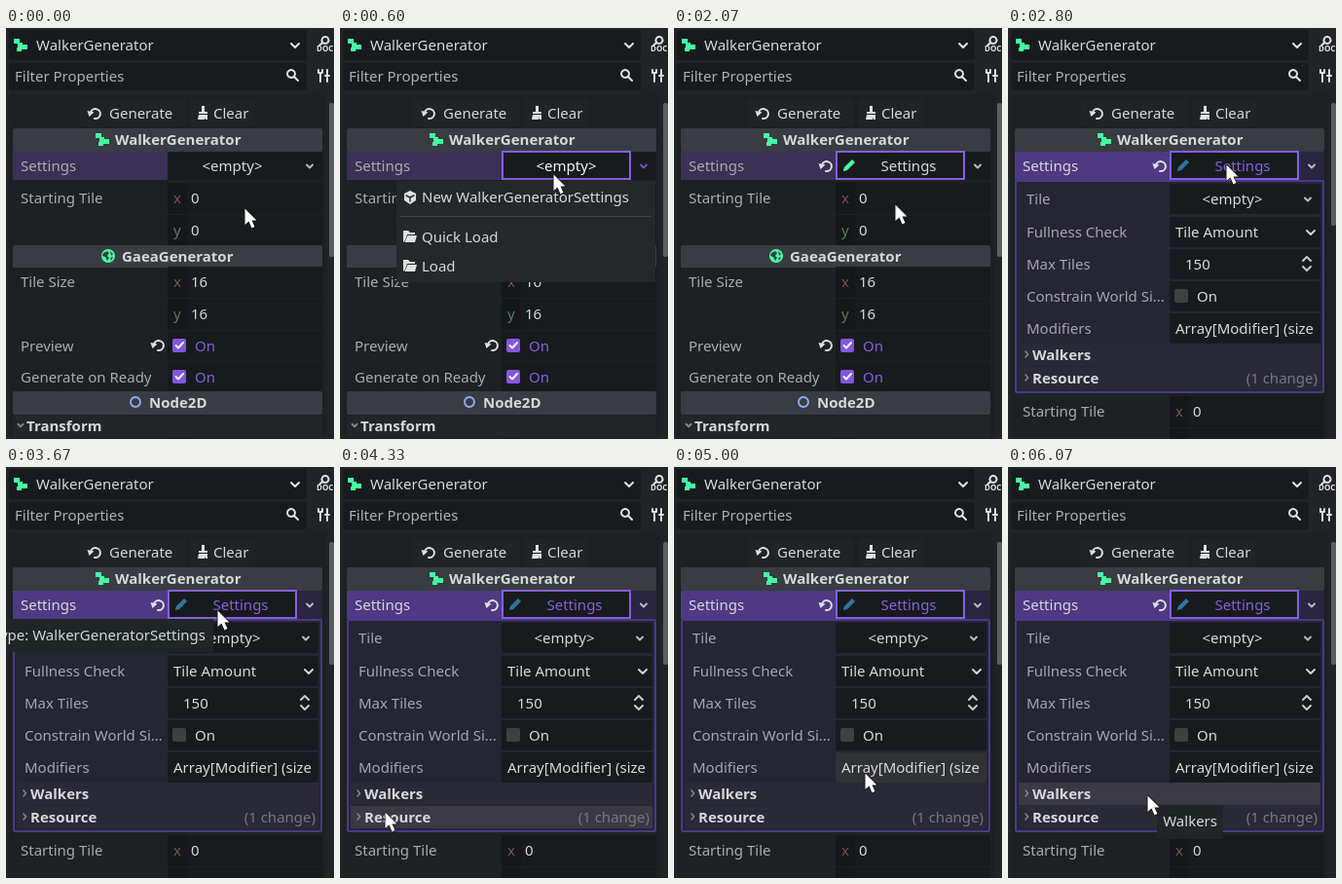
An HTML page with a canvas that plays this animation: 337x422 px, repeating every 6390 ms.

```html
<!DOCTYPE html>
<html lang="en">
<head>
<meta charset="utf-8">
<title>Inspector</title>
<style>
  html, body { margin: 0; width: 100%; height: 100%; overflow: hidden; background: #202427; }
  canvas { display: block; }
</style>
</head>
<body>
<canvas id="stage" width="337" height="422"></canvas>
<script>
const ctx = document.getElementById('stage').getContext('2d');
const LOOP = 6390, TICK = 1000 / 15;
const C = {
  base: '#202427', panel: '#1d2124', field: '#181b1e', axis: '#15171a', header: '#393c41',
  text: '#d6d7d8', label: '#a9abad', dim: '#77777f', white: '#f2f2f3',
  purple: '#855fe0', green: '#45ffa2', inner: '#262534', border: '#4a3986'
};

// Pointer tip: [tick, x, y], linear between entries.
const pointerPath = [
  [0, 245, 185], [4, 219, 150], [11, 219, 150], [19, 228, 186], [22, 228, 186],
  [23, 228, 185], [27, 228, 185], [29, 227, 181], [34, 227, 181], [38, 224, 140],
  [44, 224, 140], [47, 222, 145], [54, 222, 145], [55, 217, 147], [64, 62, 328],
  [65, 46, 354], [68, 62, 402], [70, 62, 402], [75, 196, 314], [76, 212, 292],
  [77, 205, 289], [80, 127, 339], [82, 143, 337], [96, 143, 337]
];

function pointerAt(tick) {
  const i = pointerPath.findIndex(p => p[0] > tick);
  const [t0, x0, y0] = pointerPath[i - 1], [t1, x1, y1] = pointerPath[i];
  const k = (tick - t0) / (t1 - t0);
  return { x: Math.round(x0 + (x1 - x0) * k), y: Math.round(y0 + (y1 - y0) * k) };
}

function rect(x, y, w, h, color, radius = 0) {
  ctx.fillStyle = color;
  ctx.beginPath();
  ctx.roundRect(x, y, w, h, radius);
  ctx.fill();
}

function text(s, x, y, color = C.text, { bold = false, size = 15, align = 'left' } = {}) {
  ctx.font = `${bold ? 'bold ' : ''}${size}px "Noto Sans", sans-serif`;
  ctx.textAlign = align;
  ctx.fillStyle = color;
  ctx.fillText(s, x, y);
}

// Draws an SVG path at an offset, filled unless a line width is given.
function shape(d, x, y, color, width = 0) {
  ctx.save();
  ctx.translate(x, y);
  const path = new Path2D(d);
  if (width) {
    ctx.strokeStyle = color;
    ctx.lineWidth = width;
    ctx.lineCap = ctx.lineJoin = 'round';
    ctx.stroke(path);
  } else {
    ctx.fillStyle = color;
    ctx.fill(path);
  }
  ctx.restore();
}

const chevron = (x, y, color = '#b9bbbd', r = 3) => shape(`M${-r} ${-r / 2}L0 ${r / 2}L${r} ${-r / 2}`, x, y, color, 2);
const reload = (x, y) => {
  shape('M-4 -1A5 5 0 1 1 0 5', x, y, '#e0e0e0', 2);
  shape('M-7.500 -3L-.5 -1.500L-5.500 3Z', x, y, '#e0e0e0');
};
const walkerIcon = (x, y) => shape('M0 1H6V5H9V7H14V12H8V14H3V10H4V6H0Z', x, y, C.green);
const folder = (x, y) => {
  shape('M0 0H5L7 2H12V4H4L2 10L0 12Z', x, y, '#e0e0e0');
  shape('M4.500 5H14L12 12H1.500Z', x, y, '#e0e0e0');
};

function header(title, x, y) {
  rect(7, y, 318, 24, C.header, 2);
  text(title, x, y + 17, C.text, { bold: true });
}

function axisField(name, value, y) {
  rect(166, y, 159, 32, C.field);
  rect(166, y, 20, 32, C.axis);
  text(name, 172, y + 21, name === 'x' ? '#76564f' : '#55805c');
  text(value, 190, y + 21);
}

function checkRow(label, y, changed) {
  text(label, 15, y + 21, C.label);
  rect(166, y, 159, 31, C.field);
  if (changed) reload(156, y + 15);
  rect(171, y + 8, 14, 14, '#8257df', 2);
  shape('M3.500 7L6 9.500L11 4', 171, y + 8, C.white, 2);
  text('On', 194, y + 21, C.purple);
}

function drawTop() {
  rect(0, 0, 337, 422, C.base);
  rect(3, 2, 306, 31, C.field, 2);
  walkerIcon(8, 10);
  text('WalkerGenerator', 31, 23);
  chevron(297, 18, '#e0e0e0', 4);
  rect(3, 36, 306, 28, C.field, 2);
  text('Filter Properties', 9, 55, '#aeb0b2');
  shape('M4 0A4 4 0 1 1 3.990 0M7 7L11 11', 289, 43, '#e0e0e0', 2);

  shape('M6 0A3.500 3.500 0 1 1 5.990 0M3 6L0 9', 322, 9, '#e0e0e0', 2);
  text('DOC', 319, 24, '#e0e0e0', { bold: true, size: 8 });
  shape('M0 0V3H4V0M2 3V12M9 0V6M7 6H11M9 8V12', 321, 43, '#e0e0e0', 2);

  rect(3, 68, 326, 354, C.panel);
  rect(75, 73, 110, 29, C.base, 2);
  reload(91, 88);
  text('Generate', 106, 93);
  rect(189, 73, 67, 29, C.base, 2);
  shape('M4 0H7V6H10V8H1V6H4ZM1 9H10V14H8V12L7 14H0Z', 197, 80, '#e0e0e0');
  text('Clear', 213, 93);
  header('WalkerGenerator', 112, 103);
  walkerIcon(92, 107);
}

function drawSettings(s) {
  rect(7, 127, 159, 29, s.expanded ? '#4d3a83' : '#3b3156');
  if (s.expanded) rect(299, 127, 26, 29, '#2a2540');
  text('Settings', 15, 147, s.expanded ? C.text : C.label);
  rect(166, 127, s.expanded ? 133 : 159, 29, C.field);
  const pressed = s.pressed || s.expanded;
  if (s.assigned) {
    reload(156, 142);
    shape('M0 11L1 8L9 0L12 3L4 11L0 12Z', 174, 135, pressed ? '#3074a0' : C.green);
    text('Settings', 241, 147, pressed ? C.purple : C.text, { align: 'center' });
  } else {
    text('<empty>', 232.5, 147, s.pressed ? C.purple : s.hover ? C.white : C.text, { align: 'center' });
  }
  if (s.focused) {
    ctx.strokeStyle = C.purple;
    ctx.lineWidth = 2;
    ctx.strokeRect(167, 127, 131, 28);
  }
  chevron(312, 142, s.popup ? '#7150bd' : '#b9bbbd');
}

function drawCollapsed() {
  text('Starting Tile', 15, 180, C.label);
  axisField('x', '0', 159);
  axisField('y', '0', 192);

  header('GaeaGenerator', 119, 223);
  shape('M7 0A7 7 0 1 1 6.990 0', 98, 227, C.green);
  shape('M2 4L6 2L8 4L6 7L8 9L6 12L4 8L1 7ZM9 2L12 5L10 7ZM9 9L12 8L10 12Z', 98, 227, C.header);
  text('Tile Size', 15, 266, C.label);
  axisField('x', '16', 245);
  axisField('y', '16', 278);
  rect(7, 246, 318, 1, C.panel);
  checkRow('Preview', 311, true);
  checkRow('Generate on Ready', 343, false);

  header('Node2D', 147, 373);
  shape('M5 0A5 5 0 1 1 4.990 0', 128, 379, '#8da5f3', 2);
  rect(7, 398, 318, 22, '#222629');
  chevron(15, 408, '#85878a', 2.5);
  text('Transform', 21, 414, C.text, { bold: true });
  rect(166, 421, 20, 1, C.axis);
}

function section(title, y, hovered) {
  rect(11, y, 310, 23, hovered ? '#3a3944' : '#2a2937');
  shape('M0 0L2.500 3L0 6', 18, y + 8, '#85878a', 1.5);
  text(title, 25, y + 17, C.text, { bold: true });
}

function drawExpanded(s) {
  rect(7, 156, 318, 219, C.border, 2);
  rect(9, 158, 314, 215, C.inner);
  const rows = ['Tile', 'Fullness Check', 'Max Tiles', 'Constrain World Si...', 'Modifiers'];
  rows.forEach((label, i) => {
    const y = i ? 161 + 33 * i : 160;
    text(label, 19, y + 21, '#a5a5ad');
    rect(166, y, 155, 31, i === 4 && s.overModifiers ? '#303235' : C.field, 2);
  });
  text('<empty>', 230.5, 181, C.text, { align: 'center' });
  chevron(308, 176);
  text('Tile Amount', 172, 215);
  chevron(311, 210, '#d0d1d3', 4);
  text('150', 182, 248);
  shape('M0 4L4 0L8 4M0 10L4 14L8 10', 303, 235, '#c9cacc', 2);
  rect(171, 268, 14, 14, '#3f4041', 2);
  text('On', 194, 281);
  ctx.save();
  ctx.beginPath();
  ctx.rect(166, 293, 149, 31);
  ctx.clip();
  text('Array[Modifier] (size', 172, 314);
  ctx.restore();

  section('Walkers', 324, s.overWalkers);
  section('Resource', 348, s.overResource);
  text('(1 change)', 318, 365, C.dim, { align: 'right' });

  text('Starting Tile', 15, 399, C.label);
  axisField('x', '0', 378);
  axisField('y', '', 411);
}

function drawPopup(hovered) {
  rect(58, 157, 266, 104, '#24282b');
  if (hovered) rect(58, 160, 266, 29, '#383c40');
  shape('M7 0L13 3V10L7 14L1 10V3Z', 65, 167, '#e0e0e0');
  shape('M3 5L7 7L11 5M7 7V11', 65, 167, '#24282b', 1.4);
  text('New WalkerGeneratorSettings', 84, 179);
  rect(62, 193, 258, 1, '#414548');
  folder(65, 208);
  text('Quick Load', 84, 220);
  folder(65, 238);
  text('Load', 84, 250);
}

function tooltip(s, x, y, w, h, right) {
  rect(x, y, w, h, '#202527');
  text(s, right, y + 22, C.text, { align: 'right' });
}

function draw(time) {
  const tick = Math.floor((time % LOOP + 3.4) / TICK);
  const p = pointerAt(tick);
  const between = (a, b) => tick >= a && tick < b;
  const inside = (x0, y0, x1, y1) => p.x >= x0 && p.x < x1 && p.y >= y0 && p.y < y1;
  const state = {
    hover: inside(166, 127, 299, 156),
    focused: tick >= 8,
    pressed: tick === 8 || between(40, 42),
    popup: between(9, 31),
    assigned: tick >= 31,
    expanded: tick >= 42,
    overModifiers: inside(166, 293, 321, 324),
    overWalkers: inside(11, 324, 321, 347),
    overResource: inside(11, 348, 321, 371)
  };

  drawTop();
  if (state.expanded) drawExpanded(state); else drawCollapsed();
  drawSettings(state);
  rect(332, 77, 5, state.expanded ? 126 : 158, '#5b5e61', 2);
  if (state.popup) drawPopup(inside(58, 160, 324, 189));
  if (tick === 55) tooltip('Type: WalkerGeneratorSettings', 0, 156, 213, 34, 205);
  if (tick >= 91) tooltip('Walkers', 153, 347, 68, 35, 215);

  const arrow = 'M.5 .5V17L4.500 13.500L7.500 20.500L10.500 19L7.500 12.500H12.500Z';
  shape(arrow, p.x, p.y, '#111', 1.6);
  shape(arrow, p.x, p.y, '#fff');
}

function play(now) {
  draw(now);
  requestAnimationFrame(play);
}
draw(0);
requestAnimationFrame(play);
</script>
</body>
</html>
```
